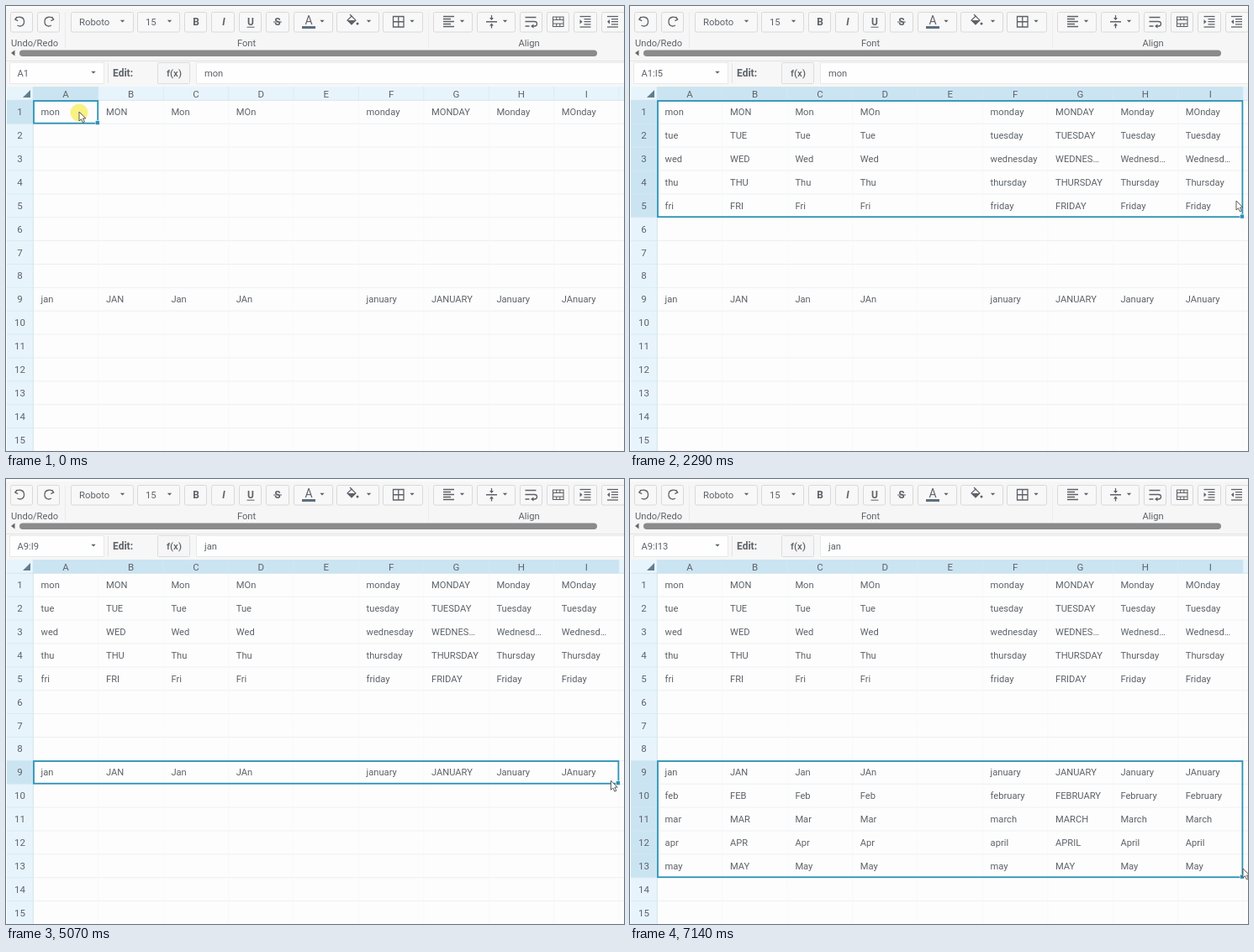
An HTML page for the animation above (7.2 s loop, 735 px wide and 530 px high).

```html
<!DOCTYPE html>
<html lang="en">
<head>
<meta charset="utf-8">
<title>Spreadsheet autofill</title>
<style>
html, body { margin: 0; width: 100%; height: 100%; overflow: hidden; background: #fdfdfd; }
svg { display: block; width: 735px; height: 530px; font: 11.15px Roboto, sans-serif; }
</style>
</head>
<body>
<svg id="stage" viewBox="0 0 735 530" xmlns="http://www.w3.org/2000/svg">
  <g id="bar"></g>
  <g id="sheet"></g>
  <g id="pointer"></g>
</svg>
<script>
const LOOP = 7200;
const INK = '#5d6268', DARK = '#cbe4f2', LIGHT = '#e8f4fb', TINT = '#e7f4f9', TEAL = '#2a92b4';
const X0 = 32.4, Y0 = 112.3, CW = 77.4, RH = 27.88;
const $ = id => document.getElementById(id);
const colX = c => X0 + c * CW;
const rowY = r => Y0 + (r - 1) * RH;
const letter = c => String.fromCharCode(65 + c);

const rect = (x, y, w, h, fill, more = '') =>
  `<rect x="${x}" y="${y}" width="${w}" height="${h}" fill="${fill}" ${more}/>`;
const path = (d, stroke = INK, w = 1.3, fill = 'none') =>
  `<path d="${d}" stroke="${stroke}" stroke-width="${w}" fill="${fill}"/>`;
const text = (s, x, y, more = '') => `<text x="${x}" y="${y}" fill="${INK}" ${more}>${s}</text>`;
const mid = 'text-anchor="middle"';

// Toolbar and edit line
function drawBar() {
  const button = (x, w) => rect(x + .5, 7.5, w - 1, 23.5, '#f8f8f8', 'rx="2" stroke="#d9d9d9"');
  const caret = (x, y = 18) => path(`M${x - 2.7} ${y - 1.2}h5.4l-2.7 2.8z`, 'none', 0, INK);
  const lines = (x, y, widths, gap = 3) => path(widths.map((w, i) => `M${x} ${y + i * gap}h${w}`).join(''));
  const boxes = [[5, 27], [37, 27], [77, 75], [156, 51], [212, 27], [244, 28], [277, 27], [309, 28],
    [342, 47], [393, 51], [448, 48], [508, 47], [560, 46], [611, 27], [643, 27], [675, 28], [708, 28]];
  const glyph = (s, x, more) => text(s, x, 23.3, `${mid} font-size="12" font-weight="700" ${more}`);
  let s = rect(0, 0, 735, 66, '#f6f6f6') + rect(0, 0, 735, 3, '#fbfbfb');
  s += boxes.map(b => button(...b)).join('');
  // undo and redo
  const turn = 'M13 13l-2.2 3 3.4 1.6M11 16c2-4 10-4 10.5 2s-5 7-8 5';
  s += path(turn) + `<g transform="translate(67.5 0) scale(-1 1)">${path(turn)}</g>`;
  s += text('Roboto', 87, 23, 'font-size="11.3"') + caret(138.5);
  s += text('15', 166, 23, 'font-size="11.3"') + caret(194.5);
  s += glyph('B', 226) + glyph('I', 259, 'font-style="italic"');
  s += glyph('U', 291) + path('M286.500 25.200h9', INK, 1);
  s += glyph('S', 323) + path('M318 19h10', INK, 1);
  s += text('A', 360, 22, `${mid} font-size="14"`) + rect(352, 24, 16, 3, '#5d6f80') + caret(376);
  s += path('M406 17l5-5 5 5-5 5z', INK, 1.2) + path('M406 17h10l-5 5z', 'none', 0, INK) +
    path('M409 10l3 3', INK, 1.2) + '<circle cx="418" cy="21" r="1.500" fill="#5d6268"/>' + caret(431.5);
  s += path('M460.500 12.500h12.500v12.500h-12.500zM466.750 12.500v12.500M460.500 18.750h12.500') + caret(483);
  s += lines(520, 12.5, [13, 9, 13, 9, 13]) + caret(542.5);
  s += path('M571 18.750h13M577.500 11v5M577.500 26.500v-5') +
    path('M575 14h5l-2.500 3zM575 23.500h5l-2.500 -3z', 'none', 0, INK) + caret(593.5);
  s += path('M617.500 13.500h13M617.500 18.500h11c4 0 4 5.500 0 5.500h-3M617.500 24h5') +
    path('M627.500 21.500v5l-3.500 -2.500z', 'none', 0, INK);
  s += path('M650.500 13h12.500v11.500h-12.500zM650.500 16.500h12.500M650.500 21h12.500M654.700 13v3.500M658.800 13v3.500M654.700 21v3.500M658.800 21v3.500', INK, 1.1);
  for (const [x, d] of [[682.5, 'M682.500 16l3 2.750-3 2.750z'], [715, 'M718 16l-3 2.750 3 2.750z']])
    s += lines(x, 12.5, [13]) + lines(x + 5, 15.6, [8, 8, 8], 3.1) + lines(x, 25, [13]) + path(d, 'none', 0, INK);
  s += path('M70.500 8v42M502.500 8v42', '#ebebeb', 1);
  s += text('Undo/Redo', 6, 47.5) + text('Font', 286, 47.5, mid) + text('Align', 622, 47.5, mid);
  s += path('M10.500 52.500v7l-4.500 -3.500z', 'none', 0, '#666') + rect(16, 52.5, 687, 7.5, '#8b8b8b', 'rx="3.75"');
  // edit line
  s += rect(0, 65, 735, 31, '#f7f7f7') + path('M0 65.500h735', '#e3e3e3', 1);
  s += rect(4.5, 67.5, 112, 25, '#fefefe', 'stroke="#e9e9e9"') + caret(104, 79);
  s += path('M121.500 68v24', '#e2e2e2', 1) + text('Edit:', 127, 83.5, 'font-size="12" font-weight="700"');
  s += rect(180.5, 67.5, 38, 25, '#f6f6f6', 'rx="1" stroke="#dcdcdc"');
  s += text('f(x)', 200, 83.5, `${mid} font-size="11.5" font-weight="500"`);
  s += rect(226.5, 67.5, 520, 25, '#fefefe', 'stroke="#e9e9e9"');
  $('bar').innerHTML = s;
}

// Cell contents
const days = ['monday', 'tuesday', 'wednesday', 'thursday', 'friday'];
const months = ['january', 'february', 'march', 'april', 'may'];
const upper = s => s.toUpperCase();
const title = s => upper(s[0]) + s.slice(1);
const styles = [s => s, upper, title, (s, first) => first ? upper(s.slice(0, 2)) + s.slice(2) : title(s)];

function clip(s) {
  if (s.length < 9 || s === s.toLowerCase()) return s;
  return s.slice(0, s === upper(s) ? 6 : 7) + '…';
}

function words(list, row, count) {
  let s = '';
  list.slice(0, count).forEach((name, i) => styles.forEach((style, c) => {
    const y = rowY(row + i) + 18;
    s += text(style(name.slice(0, 3), !i), colX(c) + 9.2, y);
    s += text(clip(style(name, !i)), colX(c + 5) + 9.2, y);
  }));
  return s;
}

// Pointer moves: start, end, x, y, easing power
const moves = [
  [70, 770, 720, 134, 2.2], [910, 1170, 727, 138, 2], [1450, 2150, 721, 233, 3],
  [2690, 2820, 120, 352, 2], [3020, 3090, 88, 360, 2], [3550, 4240, 714, 361, 2.2],
  [4310, 4520, 719, 360, 2], [5000, 5410, 727, 364, 2], [5670, 6340, 729, 465, 2.2]
];
const ease = (p, k) => p < .5 ? (2 * p) ** k / 2 : 1 - (2 - 2 * p) ** k / 2;

function pointerAt(t) {
  let x = 87, y = 127;
  for (const [a, b, tx, ty, k] of moves) {
    if (t < a) break;
    const n = Math.round((b - a) / 69);
    const p = ease(Math.min(1, Math.floor((t - a) / (b - a) * n + .1) / n), k);
    x += (tx - x) * p;
    y += (ty - y) * p;
  }
  return { x, y };
}

const stages = [[0, 'select', 1], [840, 'range', 1], [1450, 'fill', 1], [2220, 'done', 1],
  [3290, 'select', 9], [4310, 'range', 9], [5670, 'fill', 9], [6410, 'done', 9]];

function drawSheet(mode, row, col, end, later) {
  const dragging = mode === 'select' || mode === 'fill';
  const boxCol = mode === 'select' ? 0 : 8;
  const boxEnd = mode === 'done' ? end : row;
  const name = letter(0) + row + (col || end > row ? ':' + letter(col) + end : '');
  let s = text(name, 13.5, 83.5) + text(row === 1 ? 'mon' : 'jan', 236, 83.5);
  s += rect(0, 96, 735, 434, '#fdfdfd') + rect(1, 96, 734, 16.3, LIGHT) + rect(1, 96, 31.4, 434, LIGHT);
  s += rect(X0, 96, (col + 1) * CW, 16.3, DARK);
  s += rect(1, rowY(row), 31.4, (boxEnd - row + 1) * RH, DARK);
  if (dragging && (col || mode === 'fill'))
    s += rect(X0, rowY(row), (col + 1) * CW, (end - row + 1) * RH, TINT);
  for (let r = 1; r <= 15; r++) {
    const y = rowY(r + 1);
    s += path(`M1 ${y}h31.400`, '#d6e8f1', .8) + path(`M${X0} ${y}H735`, '#e9edef', .8);
    s += text(r, 16.5, rowY(r) + 18, `${mid} font-size="11.5"`);
  }
  for (let c = 0; c < 10; c++) {
    s += path(`M${colX(c)} 96V112`, '#d6e8f1', .7) + path(`M${colX(c)} 112V530`, '#f7f8f8', .7);
    if (c < 9) s += text(letter(c), colX(c) + CW / 2, 108.5, `${mid} font-size="11.5"`);
  }
  s += path('M1 112.300H735M32.400 96V530', '#cfe2ec', .8) + path('M29 100v9h-9z', 'none', 0, '#607f92');
  s += words(days, 1, later ? 5 : 1) + words(months, 9, row === 9 && mode === 'done' ? 5 : 1);
  const right = colX(boxCol + 1), bottom = rowY(boxEnd + 1);
  s += rect(X0 + .6, rowY(row) + .7, right - X0 - 1.2, bottom - rowY(row) - 1.2, 'none', `stroke="${TEAL}" stroke-width="1.8"`);
  s += rect(right - 3.6, bottom - 3.6, 5, 5, TEAL, 'stroke="#fff" stroke-width=".6"');
  $('sheet').innerHTML = s;
  return { right, bottom };
}

function drawPointer({ x, y }, glow, cross) {
  let s = glow ? `<circle cx="${x}" cy="${y}" r="10.500" fill="#f8ef6c" opacity="${glow}"/>` : '';
  if (cross) {
    const d = `M${x} ${y - 8}v16M${x - 8} ${y}h16`;
    s += path(d, '#fff', 3) + path(d, '#55554a', 1.4);
  } else {
    s += path(`M${x} ${y - 1}v11l2.500 -2.300 1.900 4.200 2 -.9 -1.900 -4.100h3.300z`, '#4a4a4a', .9, '#fff');
  }
  $('pointer').innerHTML = s;
}

function render(t) {
  const p = pointerAt(t);
  const [since, mode, row] = stages.filter(s => s[0] <= t).pop();
  const col = mode === 'select' ? Math.max(0, Math.min(8, Math.floor((p.x - X0) / CW))) : 8;
  const under = Math.floor((p.y - 3 - Y0) / RH) + 1;
  const end = mode === 'fill' ? Math.max(row, Math.min(row + 4, under)) : mode === 'done' ? row + 4 : row;
  const { right, bottom } = drawSheet(mode, row, col, end, t >= 2220);
  const held = mode === 'select' || mode === 'fill';
  const glow = held ? .85 : t - since < 69 ? .35 : 0;
  const cross = Math.hypot(p.x - right, p.y - bottom) < 4;
  drawPointer(p, glow, cross);
}

drawBar();
const start = performance.now();
(function tick() {
  render((performance.now() - start) % LOOP);
  requestAnimationFrame(tick);
})();
</script>
</body>
</html>
```
